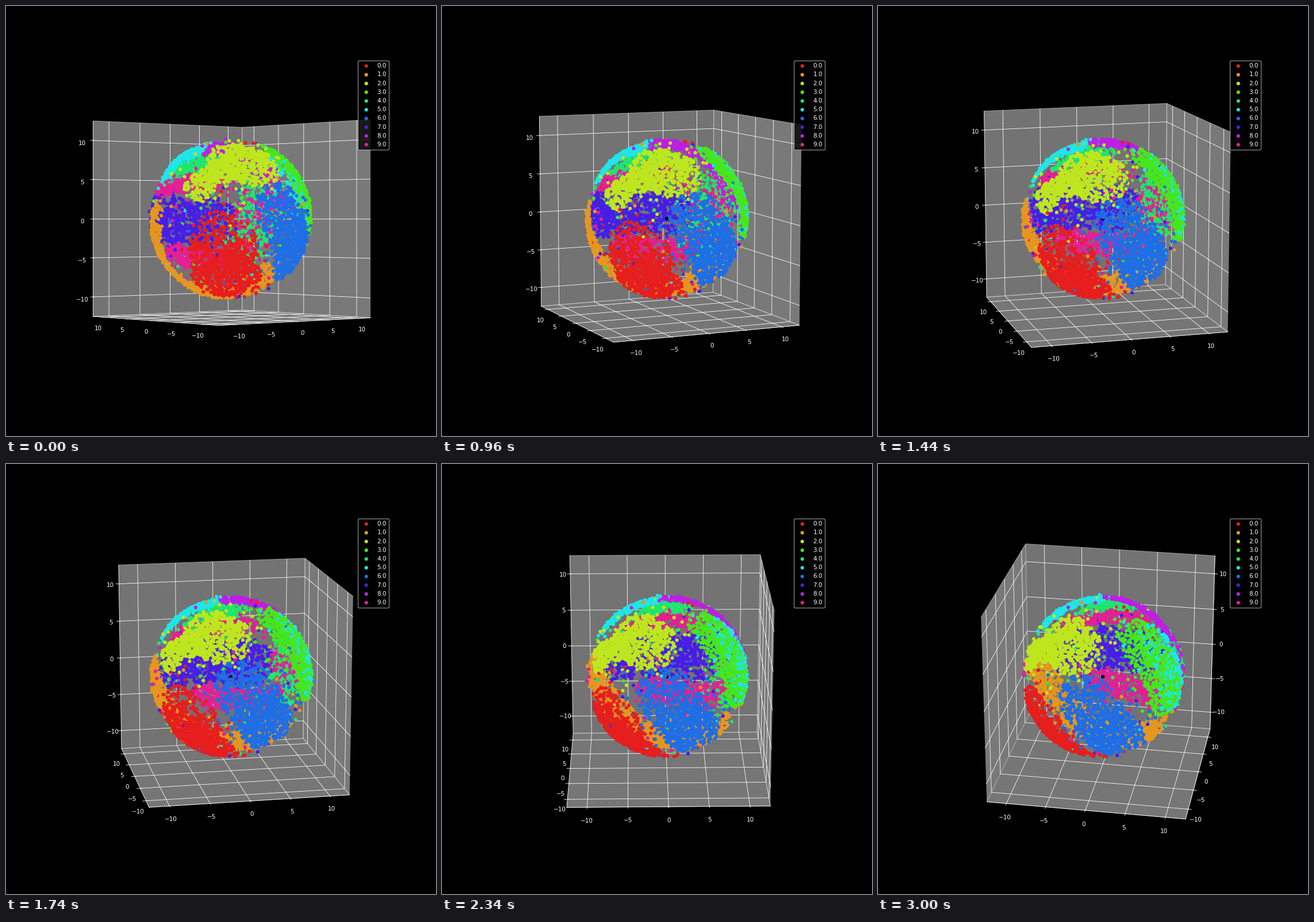
These frames come from a looping animation (748x748 px, 3060 ms). A matplotlib script:

```python
import numpy as np
import matplotlib.pyplot as plt
from colorsys import hls_to_rgb
from matplotlib.animation import FuncAnimation
from matplotlib.collections import CircleCollection

STAGE, DPI = 748, 75
FRAMES, STEP_MS = 51, 60
RADIUS, LIMIT = 10, 12.5
DOT = 20 ** 0.5 + 1.5      # marker diameter with its outline, in points
DENSITY = 720              # dots per steradian
STRAYS = 18

rng = np.random.default_rng(7)
colors = [hls_to_rgb(i / 10, 0.51, 0.8) for i in range(10)]
points, tints = [], []


def unit(v):
    return v / np.linalg.norm(v, axis=-1, keepdims=True)


def direction(lon, lat):
    lon, lat = np.radians([lon, lat])
    return np.array([np.cos(lat) * np.cos(lon),
                     np.cos(lat) * np.sin(lon), np.sin(lat)])


def add(label, dirs):
    r = RADIUS + 0.12 * np.abs(rng.normal(size=(len(dirs), 1)))
    points.append(dirs * r)
    tints.append(np.tile(colors[label], (len(dirs), 1)))


def region(label, width, *path, fill=1):
    """Scatter dots in a round-ended band along (lon, lat) key points."""
    keys = np.array([direction(*p) for p in path])
    steps = np.linalg.norm(np.diff(keys, axis=0), axis=1)
    travel = np.append(0, np.cumsum(steps))
    area = 2 * width * travel[-1] + np.pi * width ** 2
    n = int(DENSITY * fill * area)

    # overshoot both ends so that the band is evenly filled
    at = rng.uniform(-width / 2, travel[-1] + width / 2, n)
    mid = unit(np.column_stack([np.interp(at, travel, k) for k in keys.T]))
    side = rng.normal(size=(n, 3))
    side = unit(side - (side * mid).sum(axis=1, keepdims=True) * mid)
    reach = width * np.sqrt(rng.random((n, 1)))
    reach *= np.where(rng.random((n, 1)) < 0.06, 1.8, 1)
    add(label, unit(mid + side * reach))


region(0, 0.47, (-137, -20), (-135, -50))
region(1, 0.24, (160, 2), (148, -30), (130, -62), (10, -48))
region(2, 0.20, (-156, 23), (-135, 38), fill=1.3)
region(2, 0.36, (-125, 47), (-108, 42), fill=1.2)
region(3, 0.33, (-38, 48), (-27, 5))
region(4, 0.40, (38, -18), (20, 14), fill=0.5)
region(4, 0.16, (115, 36), (70, 46))
region(5, 0.17, (158, 36), (110, 58), fill=1.4)
region(5, 0.33, (-20, 38), (-18, 2), fill=0.45)
region(6, 0.38, (-92, 6), (-67, -28))
region(7, 0.32, (130, -1), (62, -2))
region(8, 0.17, (80, 66), (25, 50), (8, 12), fill=1.2)
region(9, 0.35, (30, -5), (25, 12), fill=0.5)
region(9, 0.18, (105, -27), (45, -29))
region(9, 0.16, (125, 22), (65, 28), fill=1.2)
for label in range(10):
    add(label, unit(rng.normal(size=(STRAYS, 3))))

# black centre
points.append(np.zeros((1, 3)))
tints.append(np.zeros((1, 3)))

plt.style.use("dark_background")
fig = plt.figure(figsize=(STAGE / DPI, STAGE / DPI), dpi=DPI)
ax = fig.add_subplot(projection="3d")
ax.set_box_aspect((1, 1, 1))
ax.set(xlim=(-LIMIT, LIMIT), ylim=(-LIMIT, LIMIT), zlim=(-LIMIT, LIMIT))
for axis in (ax.xaxis, ax.yaxis, ax.zaxis):
    axis.set_ticks(range(-10, 11, 5))

ax.scatter(*np.vstack(points).T, s=DOT ** 2, c=np.vstack(tints),
           linewidths=0, depthshade=False)
keys = [CircleCollection([np.pi / 4 * DOT ** 2], facecolors=[c], linewidths=0)
        for c in colors]
ax.legend(keys, [f"{i:.1f}" for i in range(10)], loc="upper right")


def update(step):
    ax.view_init(elev=0.5 * step, azim=step - 130)
    return []


anim = FuncAnimation(fig, update, frames=FRAMES, interval=STEP_MS,
                     repeat=True, repeat_delay=0)
plt.show()
```
